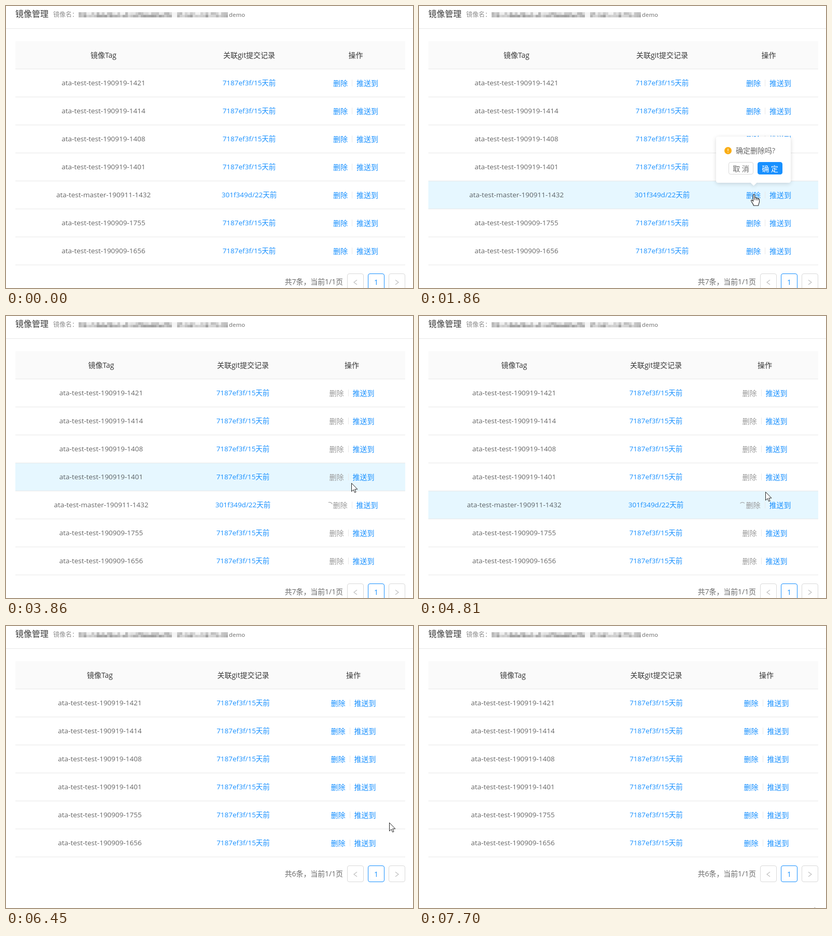
These frames come from a looping animation (785x544 px, 7770 ms). An HTML page with a canvas:

```html
<!DOCTYPE html>
<html lang="zh-CN">
<head>
<meta charset="utf-8">
<title>镜像管理</title>
<style>
html, body { margin: 0; width: 100%; height: 100%; overflow: hidden; background: #fff; }
body { font: 14px 'Open Sans', 'Noto Sans CJK SC', 'Noto Sans CJK', sans-serif; color: rgba(0,0,0,.6); }
#stage { position: relative; width: 785px; height: 544px; overflow: hidden; }
#stage div, #stage svg, #stage canvas { position: absolute; box-sizing: border-box; white-space: nowrap; }
#stage svg { overflow: visible; }
.title { left: 18px; top: 5px; font-size: 16px; line-height: 20px; color: rgba(0,0,0,.78); }
.sub { top: 7px; font-size: 12px; line-height: 20px; color: rgba(0,0,0,.45); }
.rule { left: 0; top: 43px; width: 785px; height: 1px; background: #e8e8e8; }
.scene { left: 0; top: 0; width: 785px; height: 544px; }
.row { left: 18px; width: 752px; height: 54px; line-height: 53px; border-bottom: 1px solid #e8e8e8; }
.head { top: 68px; background: #fafafa; color: rgba(0,0,0,.78); }
.head b { font-weight: 500; }
.cell { top: 0; width: 300px; margin-left: -150px; text-align: center; }
.body .cell { font-size: 13.5px; }
.link, .body .ops { color: #1890ff; }
.body .ops { font-size: 14px; }
.off { color: #999; }
.bar { display: inline-block; width: 1px; height: 13px; margin: 0 8px; background: #e8e8e8; vertical-align: -1px; }
.gap { display: inline-block; width: 14px; }
.page { height: 32px; line-height: 31px; }
.total { left: 450px; width: 200px; text-align: right; font-size: 13.9px; }
.btn { width: 32px; border: 1px solid #d9d9d9; border-radius: 4px; text-align: center; }
.now { border-color: #1890ff; color: #1890ff; font-weight: 500; }
#pop { left: 573px; top: 252px; width: 144px; height: 89px; border-radius: 4px; background: #fff;
  box-shadow: 0 2px 8px rgba(0,0,0,.15); transform-origin: 72px 95px; }
#pop .tip { left: 68px; top: 84px; width: 9px; height: 9px; background: #fff; transform: rotate(45deg); box-shadow: 3px 3px 7px rgba(0,0,0,.07); }
#pop .ask { left: 38px; top: 17px; line-height: 20px; }
#pop .act { top: 49px; width: 48px; height: 24px; line-height: 23px; text-align: center; border: 1px solid #d9d9d9; border-radius: 4px; }
#pop .act.ok { left: 80px; color: #fff; }
#press { width: 25px; height: 25px; margin: -12.5px; border-radius: 50%; background: rgba(165,210,65,.75); }
</style>
</head>
<body>
<div id="stage">
  <div class="title">镜像管理</div>
  <div class="sub" style="left:91px">镜像名：</div>
  <canvas id="blur" width="288" height="12" style="left:140px;top:11px"></canvas>
  <div class="sub" style="left:430px;font-size:11.3px;font-weight:600">demo</div>
  <div class="rule"></div>
  <div id="scenes"></div>
  <div id="pop">
    <div class="tip"></div>
    <svg width="14" height="14" style="left:16px;top:20px"><circle cx="7" cy="7" r="7" fill="#faad14"/><path d="M7 3.3v4.4M7 9.4v1.3" stroke="#fff" stroke-width="1.2"/></svg>
    <div class="ask">确定删除吗?</div>
    <div class="act" style="left:24px">取 消</div>
    <div class="act ok" id="ok">确 定</div>
  </div>
  <div id="press"></div>
  <svg id="arrow" width="14" height="20"><path d="M1.5 .5V16.6L5.2 13.1L7.6 18.6L10 17.6L7.7 12.2H12.8Z" fill="#fff" stroke="#222"/></svg>
  <svg id="hand" width="18" height="23"><path d="M-1.5 1.7C-1.5 0 1.5 0 1.5 1.7V7C2.2 6 4.5 6.4 4.6 7.8C5.6 7 7.6 7.4 7.7 8.9C8.8 8.3 10.5 8.9 10.5 10.4V14.6C10.5 17 8.8 18.4 8.6 22H-.7C-.9 19.3-3.2 17.2-5.2 13.6C-6.2 11.6-4.2 10.6-2.8 12.1L-1.5 13.6Z" fill="#fff" stroke="#222" stroke-width="1.1"/><path d="M1.5 7V11.4M4.6 7.8V11.8M7.7 8.9V12" stroke="#222" fill="none"/></svg>
</div>
<script>
const LOOP = 7770, START = 610, STEP = 77.9;
const $ = id => document.getElementById(id);

const tags = ['test-190919-1421', 'test-190919-1414', 'test-190919-1408', 'test-190919-1401',
  'master-190911-1432', 'test-190909-1755', 'test-190909-1656'];
const BUSY = 4;

// Column centres and row state of the three table layouts
const layouts = [
  { cols: [188, 469, 674.5], rows: tags },
  { cols: [183.5, 457, 667], rows: tags, busy: true },
  { cols: [181, 457.5, 670], rows: tags.filter((_, i) => i !== BUSY) }
];

// [layout, row, enter, leave]
const hovers = [
  [0, 6, 680, 830], [0, 5, 830, 1085], [0, 4, 1085, 2420],
  [1, 3, 3110, 4330], [1, 4, 4330, 9000],
  [2, 4, 6510, 6620], [2, 5, 6620, 6840]
];

// [time, x, y] of the pointer tip
const path = [
  [0, 709, 600], [600, 709, 545], [680, 704, 500], [840, 688, 440], [1080, 666, 390], [1310, 650, 367],
  [1400, 646, 363], [2340, 645, 363], [2500, 652, 346], [2760, 665, 317], [2870, 666, 316],
  [3190, 666, 318], [3860, 665, 322], [4150, 665, 324], [4400, 667, 336], [4740, 667, 339], [5500, 668, 340],
  [5600, 672, 341], [5840, 700, 342], [6100, 722, 352], [6370, 738, 373], [6610, 739, 390],
  [6850, 748, 447], [7160, 766, 523], [7310, 769, 546], [7620, 768, 546], [7695, 762, 542.5], [LOOP, 762, 542.5]
];

const cell = (x, html, cls = '') => `<div class="cell ${cls}" style="left:${x - 18}px">${html}</div>`;

function chevron(x, y, dir) {
  return `<div class="page btn" style="left:${x}px;top:${y}px"><svg width="30" height="30" style="left:0;top:0">
    <path d="M${15 - 3 * dir} 11.5l${6 * dir} 4.5l${-6 * dir} 4.5" fill="none" stroke="#bfbfbf" stroke-width="1.2"/></svg></div>`;
}

function build({ cols, rows, busy }) {
  const [a, b, c] = cols;
  let html = `<div class="row head">${cell(a, '镜像<b>Tag</b>')}${cell(b, '关联<b>git</b>提交记录')}${cell(c, '操作')}</div>`;
  rows.forEach((tag, i) => {
    const git = tag[0] === 'm' ? '301f349d/22天前' : '7187ef3f/15天前';
    const load = busy && i === BUSY;
    const spin = `<svg class="spin" width="1" height="1" style="left:${c - 18 - 43.5}px;top:26.5px">
      <path d="M6 0A6 6 0 0 0 0 -6" fill="none" stroke="#999"/></svg>`;
    const ops = `${load ? '<span class="gap"></span>' : ''}<span class="${busy ? 'off' : ''}">删除</span><span class="bar"></span>推送到`;
    html += `<div class="row body" style="top:${122 + 54 * i}px">${cell(a, 'ata-test-' + tag)}${cell(b, git, 'link')}${cell(c, ops, 'ops')}${load ? spin : ''}</div>`;
  });
  const y = 138 + 54 * rows.length;
  html += `<div class="page total" style="top:${y}px">共${rows.length}条，当前1/1页</div>` +
    chevron(658, y, -1) + `<div class="page btn now" style="left:698px;top:${y}px">1</div>` + chevron(738, y, 1);
  const el = document.createElement('div');
  el.className = 'scene';
  el.innerHTML = html;
  $('scenes').append(el);
  return { el, rows: [...el.querySelectorAll('.body')], spin: el.querySelector('.spin') };
}

function drawBlur() {
  const g = $('blur').getContext('2d');
  let seed = 19;
  const rnd = () => (seed = (seed * 16807) % 2147483647) / 2147483647;
  for (let x = 0; x < 286; x += 5) {
    const space = x > 178 && x < 186;
    for (let y = 1; y < 11; y += 5) {
      const v = space ? 245 : Math.round((y > 4 ? 160 : 185) + rnd() * 58);
      g.fillStyle = `rgb(${v},${v},${v})`;
      g.fillRect(x, y, 5, 5);
    }
  }
}

const clamp = v => Math.max(0, Math.min(1, v));
const smooth = v => (v = clamp(v)) * v * (3 - 2 * v);
const within = (t, a, b) => t >= a && t < b;

function pointer(t) {
  const i = Math.max(1, path.findIndex(p => p[0] >= t));
  const [t0, x0, y0] = path[i - 1], [t1, x1, y1] = path[i];
  const k = clamp((t - t0) / (t1 - t0));
  return [Math.round(x0 + (x1 - x0) * k), Math.round(y0 + (y1 - y0) * k)];
}

const scenes = layouts.map(build);
drawBlur();

function render(time) {
  const n = Math.floor((time - 596) / 77.7);
  const t = n < 0 ? 0 : START + n * STEP;

  const mode = t < 2980 ? 0 : t < 6445 ? 1 : 2;
  scenes.forEach((s, i) => s.el.style.display = i === mode ? '' : 'none');
  scenes[mode].rows.forEach(r => r.style.backgroundColor = '');
  for (const [m, row, a, b] of hovers) {
    if (m !== mode) continue;
    const k = smooth((Math.min(t, b) - a) / 250) * (1 - smooth((t - b) / 300));
    if (k > 0) scenes[m].rows[row].style.backgroundColor = `rgba(230,247,255,${k})`;
  }
  scenes[1].spin.style.transform = `rotate(${t * .36 + 20.6}deg)`;

  const shown = smooth((t - 1640) / 220) * (1 - smooth((t - 2960) / 150));
  $('pop').style.opacity = shown;
  $('pop').style.transform = `scale(${.8 + .2 * shown})`;
  $('ok').style.background = $('ok').style.borderColor = within(t, 2640, 3050) ? '#369ffb' : '#1890ff';

  const [x, y] = pointer(t);
  const hand = within(t, 1300, 2430) || within(t, 2660, 3060);
  const place = (el, on) => {
    el.style.display = on ? '' : 'none';
    el.style.left = x + 'px';
    el.style.top = y + 'px';
  };
  place($('hand'), hand);
  place($('arrow'), !hand);
  place($('press'), within(t, 1540, 1700) || within(t, 2780, 2960));
}

const begin = performance.now();
function tick() {
  render((performance.now() - begin) % LOOP);
  requestAnimationFrame(tick);
}
tick();
</script>
</body>
</html>
```
